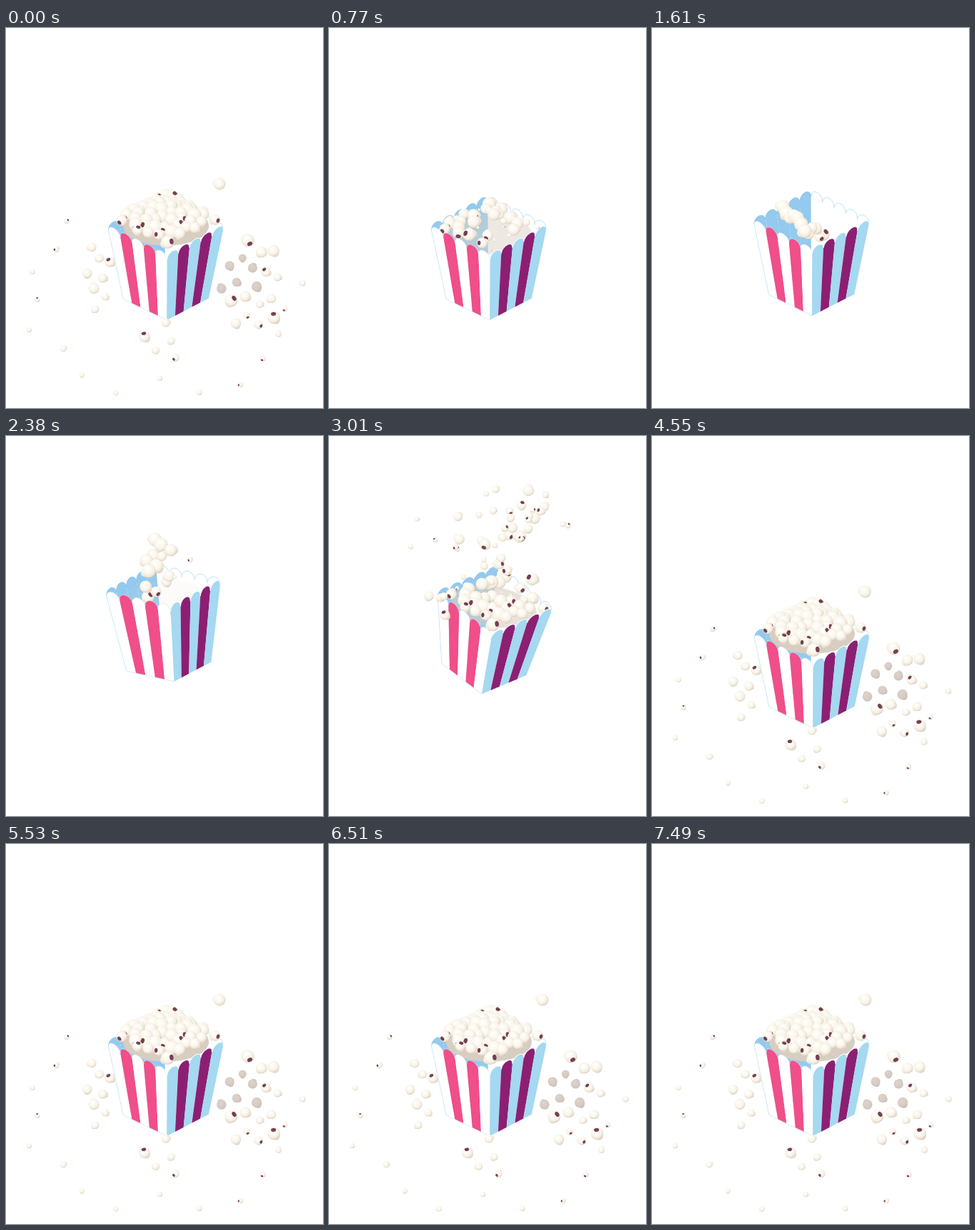
An HTML page with a canvas that plays this animation: 444x532 px, repeating every 7560 ms.

```html
<!DOCTYPE html>
<html lang="en">
<head>
<meta charset="utf-8">
<title>Popcorn</title>
<style>
html, body { margin: 0; width: 100%; height: 100%; overflow: hidden; background: #fff; }
canvas { display: block; width: 444px; height: 532px; }
</style>
</head>
<body>
<canvas id="stage" width="444" height="532"></canvas>
<script>
const ctx = document.getElementById('stage').getContext('2d');
const LOOP = 7560, STEP = 70, GRAVITY = 7.3e-4, GOLDEN = 2.39996;
const RIM = 82, TAPER = .73;

const clamp = v => Math.max(0, Math.min(1, v));
const ease = (t, a, b) => { const p = clamp((t - a) / (b - a)); return p * p * (3 - 2 * p); };
const mix = (a, b, p) => a + (b - a) * p;
const mixPt = (a, b, p) => [mix(a[0], b[0], p), mix(a[1], b[1], p)];
const rnd = n => { const s = Math.sin(n * 12.9898) * 43758.5453; return s - Math.floor(s); };

// Box pose: rim centre x and y, yaw, roll, tilt towards the viewer, height
const REST = [224, 275, -.02, 0, .5, 104];
const EMPTY = [223.5, 267, -.01, 0, .5, 106];
const POSES = [
  [0, REST], [840, REST],
  [1540, EMPTY], [1610, EMPTY],
  [2030, [223.5, 272, -.01, 0, .5, 103]],
  [2380, [220, 208, -.1, -.07, .36, 115]],
  [3010, [233, 228, -.04, .16, .58, 100]],
  [3850, [227, 232, 0, .02, .42, 112]],
  [4410, REST], [LOOP, REST]
];

function poseAt(t) {
  let i = 1;
  while (POSES[i][0] < t) i++;
  const [t0, a] = POSES[i - 1], [t1, b] = POSES[i], p = ease(t, t0, t1);
  return a.map((v, n) => mix(v, b[n], p));
}

const fillAt = t => t < 1500 ? 1 - ease(t, 350, 1150) : ease(t, 2100, 3750);

// Pile: a spiral squeezed into the diamond of the rim, raised in the middle
const PILE = 58;
const heap = Array.from({ length: PILE }, (_, i) => {
  const rho = Math.sqrt((i + .5) / PILE), a = i * GOLDEN;
  const c = Math.cos(a), s = Math.sin(a), d = rho / (Math.abs(c) + Math.abs(s));
  return {
    x: 74 * d * c, y: 36 * d * s - 20 * (1 - rho) - 8, r: 7.5 + 3 * rnd(i + 9), seed: i + 1,
    first: i % 5 === 2,
    inBox: [181 + 60 * i / PILE, 246 + 52 * i / PILE + 20 * (rnd(i + 4) - .5)],
    inAir: [190 + 50 * rnd(i + 2), 142 + 85 * i / PILE]
  };
}).sort((p, q) => p.y - q.y);

const ground = [];
function toss(x, y, r, rise, t0) {
  const n = ground.length + 60, from = [222 + 36 * rnd(n), 218];
  const up = Math.sqrt(rise / GRAVITY), down = Math.sqrt(Math.max(0, rise + y - from[1]) / GRAVITY);
  const shaded = x > 298 && x < 352 && y > 305 && y < 372;
  ground.push({ x, y, r, from, rise, t0, up, t1: t0 + up + down, shaded, seed: n });
}

function scatter(count, small, large, place) {
  for (let i = 0; i < count; i++) {
    const n = ground.length, [x, y] = place(i, Math.sqrt((i + .5) / count));
    toss(x, y, mix(small, large, rnd(n + 21)), 50 + 95 * rnd(n + 3), 2160 + 850 * Math.sqrt(rnd(n + 40)));
  }
}
const spiral = (cx, cy, rx, ry) => (i, rho) =>
  [cx + rx * rho * Math.cos(i * GOLDEN), cy + ry * rho * Math.sin(i * GOLDEN)];

scatter(19, 5, 9.5, spiral(344, 362, 44, 72));
scatter(8, 5, 8, spiral(130, 350, 22, 50));
scatter(5, 5, 9, spiral(222, 438, 30, 36));
scatter(15, 3.5, 5, i => {
  const a = Math.PI * (-.03 + 1.28 * i / 14), reach = .8 + .25 * rnd(i + 6);
  return [225 + 200 * reach * Math.cos(a), 370 + 143 * reach * Math.sin(a)];
});
toss(299, 218, 9, 216, 3050);
ground.sort((p, q) => p.y - q.y);

const LIT = ['#fffefa', '#fbf7ee', '#f0e8da', '#d3c6b6'];
const DIM = ['#ddd3cb', '#d8cdc5', '#d3c7bf', '#c6b9b0'];

function ball(x, y, r, tones) {
  const g = ctx.createRadialGradient(x - r * .25, y - r * .35, r * .1, x - r * .1, y - r * .15, r * 1.2);
  [0, .5, .8, 1].forEach((stop, i) => g.addColorStop(stop, tones[i]));
  ctx.fillStyle = g;
  ctx.beginPath();
  ctx.arc(x, y, r, 0, 7);
  ctx.fill();
}

function kernel(x, y, r, seed, turn, shaded) {
  if (r < .4) return;
  const tones = shaded ? DIM : LIT, a = rnd(seed) * 6.28 + turn;
  ball(x + Math.cos(a) * r * .55, y + Math.sin(a) * r * .5, r * .6, tones);
  ball(x, y, r * .95, tones);
  if (!shaded && rnd(seed + 7) < .3) {
    const s = a + 3.6;
    ctx.fillStyle = '#74404f';
    ctx.beginPath();
    ctx.ellipse(x + Math.cos(s) * r * .55, y + Math.sin(s) * r * .55, r * .28, r * .4, s, 0, 7);
    ctx.fill();
  }
}

// One wall of five scalloped stripes between a top edge (a, b) and a base (c, d)
function wall(a, b, c, d, fills, rim, rimWidth) {
  const at = (u, v) => mixPt(mixPt(a, b, u), mixPt(c, d, u), v);
  const path = pts => { ctx.beginPath(); pts.forEach(p => ctx.lineTo(...p)); };
  for (let i = 0; i < 5; i++) {
    const u = i / 5, top = [];
    for (let k = 0; k <= 16; k++) {
      const s = Math.PI * k / 16;
      top.push(at(u + (1 - Math.cos(s)) / 10, .085 * (1 - Math.sin(s))));
    }
    path([...top, at(u + .2, 1), at(u, 1)]);
    ctx.fillStyle = fills[i % 2];
    ctx.fill();
    ctx.strokeStyle = rim;
    ctx.lineWidth = rimWidth;
    path(top);
    ctx.stroke();
  }
}

function drawGround(p, t, behind) {
  const settled = t < 1500 || t >= p.t1;
  if ((settled && p.y < 398) !== behind) return;
  let { x, y } = p, size = 1, turn = 0;
  if (t < 1500) {
    const start = 70 + 430 * rnd(p.seed + 3);
    size = 1 - ease(t, start, start + 260);
  } else {
    if (t < p.t0) return;
    const roll = (p.x - 222) * -.04 * (1 - ease(t, p.t1, 4700));
    x += roll;
    if (!settled) {
      const d = t - p.t0 - p.up;
      x = mix(p.from[0], x, (t - p.t0) / (p.t1 - p.t0));
      y = p.from[1] - p.rise + GRAVITY * d * d;
      size = clamp((t - p.t0 + 30) / 110);
    }
    turn = (Math.min(t, p.t1) - p.t1) * .004 + roll * .2;
  }
  kernel(x, y, p.r * size, p.seed, turn, p.shaded && settled);
}

function drawHeap(t, inside) {
  for (const p of heap) {
    let pos = inside(p.x, p.y), size;
    if (t < 1300) {
      const start = 300 + 600 * rnd(p.seed);
      size = 1 - ease(t, start, start + 300);
    } else {
      const start = p.first ? 1300 + 180 * rnd(p.seed) : 1980 + (28 - p.y) * 20 + 120 * rnd(p.seed);
      size = ease(t, start, start + (p.first ? 130 : 240));
      if (p.first && t < 2380) pos = mixPt(p.inBox, p.inAir, ease(t, 2030, 2380));
      else if (p.first) pos = mixPt(p.inAir, pos, ease(t, 2380, 3010));
    }
    kernel(...pos, p.r * size, p.seed, 0, false);
  }
}

function draw(t) {
  ctx.fillStyle = '#fff';
  ctx.fillRect(0, 0, 444, 532);
  const [cx, cy, yaw, roll, tilt, height] = poseAt(t), fill = fillAt(t);
  const turned = (x, y) => [
    cx + x * Math.cos(roll) - y * Math.sin(roll),
    cy + x * Math.sin(roll) + y * Math.cos(roll)
  ];
  const corner = (quarter, size, drop) => {
    const a = yaw + quarter * Math.PI / 2;
    return turned(size * Math.cos(a), size * tilt * Math.sin(a) + drop);
  };
  const [R, F, L, B] = [0, 1, 2, 3].map(q => corner(q, RIM, 0));
  const [r, f, l, b] = [0, 1, 2, 3].map(q => corner(q, RIM * TAPER, height));
  const inside = (x, y) => turned(x, y * (.5 + tilt) + 22 * (1 - fill));

  ground.forEach(p => drawGround(p, t, true));

  wall(B, R, b, r, ['#fff', '#fff'], '#a9d8f1', .8);
  wall(L, B, l, b, ['#93caee', '#93caee'], '#86c0e8', .8);

  ctx.globalAlpha = fill;
  ctx.fillStyle = '#d8cdc1';
  ctx.beginPath();
  ctx.ellipse(...inside(0, 2), 60, 28, roll, 0, 7);
  ctx.fill();
  ctx.globalAlpha = 1;
  drawHeap(t, inside);

  wall(L, F, l, f, ['#fff', '#f04f89'], '#d3eaf7', .7);
  wall(F, R, f, r, ['#a5d8f1', '#8c1f72'], '#f4fbff', 1.1);
  ctx.strokeStyle = '#c3e2f4';
  ctx.lineWidth = .7;
  ctx.beginPath();
  ctx.moveTo(...mixPt(L, l, .085));
  ctx.lineTo(...l);
  ctx.lineTo(...f);
  ctx.stroke();

  ground.forEach(p => drawGround(p, t, false));
}

const begin = performance.now();
function frame() {
  const t = (performance.now() - begin) % LOOP;
  draw(Math.floor(t / STEP) * STEP);
  requestAnimationFrame(frame);
}
frame();
</script>
</body>
</html>
```
